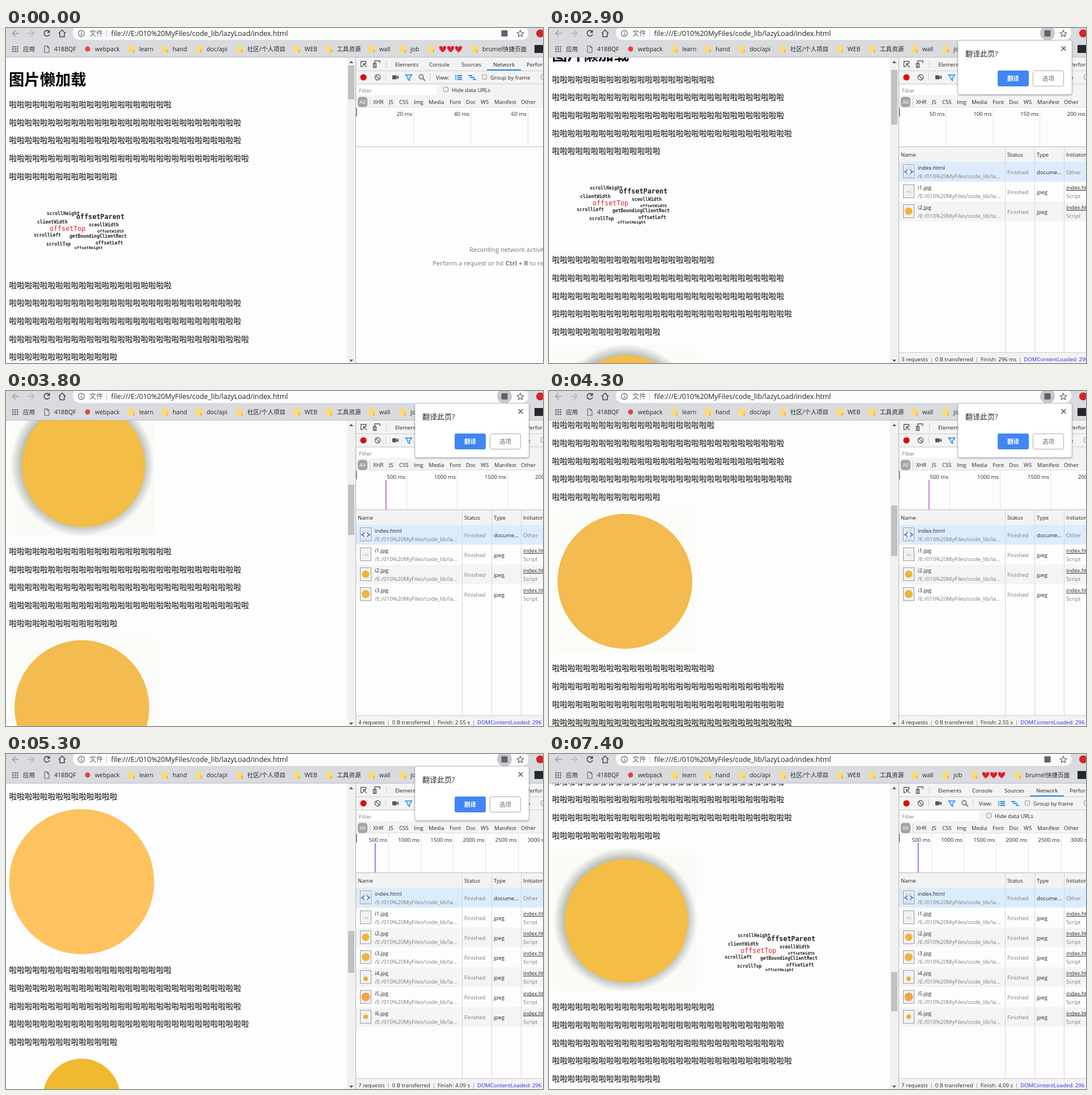
An HTML page that plays this animation: 948 px wide and 591 px high, repeating every 7.7 s.

```html
<!DOCTYPE html>
<html lang="zh-CN">
<head>
<meta charset="utf-8">
<title>图片懒加载</title>
<style>
  html, body { margin: 0; width: 100%; height: 100%; overflow: hidden; }
  svg { display: block; font: 9.6px "Open Sans", "Noto Sans CJK SC", "Noto Sans CJK", sans-serif; fill: #262626; }
  .page { font-size: 13.67px; fill: #000; }
  .mono { font-family: "DejaVu Sans Mono", monospace; font-weight: bold; }
  .bar { font-size: 10.6px; }
  .dim { fill: #7c7c7c; }
  .path { font-size: 9.8px; }
  .end { text-anchor: end; }
  .mid { text-anchor: middle; }
</style>
</head>
<body>
<svg id="stage" width="948" height="591" viewBox="0 0 948 591"></svg>
<script>
const LOOP = 7700, STEP = 100;
const GREY = '#5f6368', BLUE = '#1a8cf0', LINE = '#ccc', PANEL = '#f3f3f3', BAR = '#d9dbdf';

const text = (x, y, s, attrs = '') => `<text x="${x}" y="${y}" ${attrs}>${s}</text>`;
const rect = (x, y, w, h, fill, attrs = '') =>
  `<rect x="${x}" y="${y}" width="${w}" height="${h}" fill="${fill}" ${attrs}/>`;
const disc = (x, y, r, fill, attrs = '') => `<circle cx="${x}" cy="${y}" r="${r}" fill="${fill}" ${attrs}/>`;
const shape = (d, fill) => `<path d="${d}" fill="${fill}"/>`;
const stroke = (d, color = GREY, width = 1.3) =>
  `<path d="${d}" fill="none" stroke="${color}" stroke-width="${width}"/>`;
const each = (list, fn) => list.map(fn).join('');
const range = n => [...Array(n).keys()];

// ---- page content ----
const WORDS = [
  ['scrollHeight', 72, 330, 8], ['offsetParent', 124, 337, 11.8], ['clientWidth', 55, 345, 8.1],
  ['sceollWidth', 146, 350, 8], ['offsetTop', 77, 358, 11.7, '#e8202a'], ['offsetWidth', 161, 361, 7.1],
  ['scrollLeft', 49, 368, 8], ['getBoundingClientRect', 112, 370, 8], ['scrollTop', 71, 384, 8],
  ['offsetLeft', 158, 382, 8.1], ['offsetHeight', 121, 390, 6.9]
];
const cloud = (dx, dy) => `<g class="mono" transform="translate(${dx} ${dy - 262})">` +
  each(WORDS, ([s, x, y, size, color = '#222']) =>
    text(x, y, s, `font-size="${size}" fill="${color}"` + (s === 'offsetTop' ? ' font-weight="400"' : ''))) + '</g>';

const crown = y => `<g transform="translate(0 ${y})">` +
  shape('M89 135L77 87L97 107L105 79L119 105L133 76L148 105L162 79L171 107L191 87L177 135Z', '#c9a24b') +
  rect(88, 136, 90, 7, '#c9a24b', 'rx="3"') +
  each([[74, 79, 5], [104, 71, 6], [133, 66, 7], [163, 71, 6], [193, 79, 5]], ([x, cy, r]) =>
    shape(`M${x - r} ${cy}l${r} ${-r}l${r} ${r}l${-r} ${r}z`, '#c9a24b')) + '</g>';

const haloBall = y => rect(6, y + 24, 255, 250, '#fafbf7') +
  disc(135, y + 149, 127, 'url(#halo)') + disc(136.5, y + 150.5, 109, '#f4bd45');

// Each picture is drawn relative to the text line above it; gap is the distance to the next line.
const PICTURES = [
  { gap: 191.7, draw: y => cloud(0, y) },
  { gap: 302.5, draw: haloBall },
  { gap: 302.5, draw: y => rect(6, y + 24, 255, 250, '#fbfcf8') + disc(134, y + 148.8, 119, '#f3bb50') },
  { gap: 302.5, draw: y => crown(y) + disc(133.5, y + 196, 68, '#f2b53c') },
  { gap: 306, draw: y => disc(133.5, y + 150, 128, '#fec25f') },
  { gap: 205.5, draw: y => disc(133.5, y + 97.5, 68, '#f0b92f') },
  { gap: 302.5, draw: y => haloBall(y) + cloud(261, y + 111.5) }
];
const PITCH = 31.7;

function page(scroll, loaded) {
  let y = 135 - scroll;
  let out = rect(0, 52, 617, 539, '#fdfdfd') +
    text(5, 101 - scroll, '图片懒加载', 'font-size="27.34" font-weight="700"');
  for (const [k, picture] of [...PICTURES, null].entries()) {
    out += each([21, 30, 30, 31, 14], (n, i) => text(5.5, y + i * PITCH + 5, '啦'.repeat(n)));
    y += 4 * PITCH;
    if (!picture) break;
    if (k < loaded) out += picture.draw(y);
    y += picture.gap;
  }
  return `<g class="page">${out}</g>`;
}

function scrollbar(scroll, height) {
  const track = 514;
  return rect(602, 52, 15, 539, '#f1f1f1') + shape('M606 62l3.5-4l3.5 4z', '#555') +
    shape('M606 585l3.5 4l3.5-4z', '#555') +
    rect(604, 66 + scroll * track / height, 11, track * 539 / height, '#c1c1c1');
}

// ---- browser bars ----
const FOLDERS = [[216, 'learn'], [275, 'hand'], [335, 'doc/api'], [407, '社区/个人项目'], [508, 'WEB'],
  [565, '工具资源'], [640, 'wall'], [695, 'job'], [745, ''], [822, 'brumel快捷页面']];
const heart = x => shape(`M${x} 43C${x - 11} 35 ${x - 5} 28 ${x} 34C${x + 5} 28 ${x + 11} 35 ${x} 43Z`, '#e0202f');

const browserBars = (reloadLit, translateLit) => rect(0, 0, 948, 52, BAR) + rect(0, 51, 948, 1, '#b9bbbf') +
  rect(118, -4, 804, 25, '#fcfcfd', 'rx="12"') +
  (reloadLit ? disc(72, 9, 11.5, '#bfc1c6') : '') + (translateLit ? disc(880, 9, 13, '#c6c8cc') : '') +
  stroke('M23 9.5H12M17 4l-5.5 5.5l5.5 5.5', '#9b9ea3', 1.5) +
  stroke('M38 9.5H49M44 4l5.5 5.5l-5.5 5.5', '#b0b3b7', 1.5) +
  stroke('M76 6A5 5 0 1 0 77 11', '#45484c', 1.6) + shape('M77.5 3v5.5h-5.5z', '#45484c') +
  stroke('M93 9.5l6-6l6 6M95 8.5v7h8v-7', '#45484c', 1.5) +
  disc(133, 9.5, 5.3, 'none', `stroke="${GREY}" stroke-width="1.2"`) + stroke('M133 8.5v4M133 6v1.3') +
  text(147, 14, '文件', `font-size="12.2" fill="${GREY}"`) + rect(177, 3, 1, 13, '#c4c6ca') +
  text(185.5, 14, 'file:///E:/010%20MyFiles/code_lib/lazyLoad/index.html', 'font-size="12.46" fill="#222"') +
  rect(874.5, 4, 11, 11, GREY, 'rx="1"') +
  stroke('M908 4l1.7 3.8l4 .4l-3 2.8l.9 4l-3.6-2.1l-3.6 2.1l.9-4l-3-2.8l4-.4z', GREY, 1.2) +
  disc(943, 9.5, 7, '#d8232a') +
  `<g class="bar">` +
  each(range(9), i => rect(11 + i % 3 * 4, 32 + (i / 3 | 0) * 4, 2.4, 2.4, GREY)) + text(30, 41, '应用') +
  stroke('M68 31.5h5l3 3v8.5h-8zM73 31.5v3h3', GREY, 1.1) + text(85, 41, '418BQF') +
  disc(144, 37, 4.5, '#e8423c') + text(157, 41, 'webpack') +
  each(FOLDERS, ([x, name]) => rect(x, 31, 11, 12.5, '#fbdb78', 'rx="1"') +
    rect(x + 8, 38, 3, 5.5, '#efc04b') + text(x + 19, 41, name)) +
  each([771, 785, 799], heart) + rect(933, 30, 15, 14, '#24272b') + '</g>';

// ---- developer tools ----
const TABS = [[687, 'Elements'], [747, 'Console'], [804, 'Sources'], [860, 'Network'], [919, 'Performance']];
const TYPES = [[648, 'XHR'], [676, 'JS'], [694, 'CSS'], [720, 'Img'], [746, 'Media'], [783, 'Font'],
  [812, 'Doc'], [838, 'WS'], [862, 'Manifest'], [909, 'Other']];
const checkbox = (x, y) => rect(x + .5, y + .5, 8, 8, '#eee', 'rx="1.5" stroke="#9a9a9a"');

const TOOLS = rect(617, 52, 331, 539, '#fdfdfd') + rect(617, 52, 331, 88, PANEL) +
  rect(617, 75, 331, 1, LINE) + rect(617, 98, 331, 1, LINE) + rect(617, 139, 331, 1, '#ddd') +
  stroke('M630 68h-3.5v-9h9v3.5M631 63l6 6M631 67.5V63h4.5', '#555') +
  stroke('M651 69v-11h9v4M648.5 62.5h5v7h-5z', '#555') + rect(671, 57, 1, 13, LINE) +
  each(TABS, ([x, s]) => text(x, 67.5, s)) + rect(849, 73, 60, 2, BLUE) +
  disc(631, 87, 5.6, '#e00b0b') + disc(656, 87, 4.7, 'none', 'stroke="#555" stroke-width="1.4"') +
  stroke('M652.5 83.5l7 7', '#555') + rect(670, 80, 1, 13, LINE) +
  rect(682, 83.5, 7.5, 7, '#555') + shape('M689 87l4-3.5v7z', '#555') +
  stroke('M705.5 82.7h11l-4 5v5l-3-2v-3z', BLUE, 1.5) +
  disc(733, 86, 3.8, 'none', 'stroke="#555" stroke-width="1.3"') + stroke('M736 89l4 4', '#555', 1.6) +
  rect(748, 80, 1, 13, LINE) + text(759, 90.5, 'View:') +
  each([83, 86.3, 89.6], y => rect(793, y, 2, 2, BLUE) + rect(796.5, y, 8.5, 2, BLUE)) +
  rect(816, 83, 7, 2, BLUE) + rect(819, 86.3, 8, 2, BLUE) + rect(824, 89.6, 6, 2, BLUE) +
  checkbox(840, 82) + text(855, 90.5, 'Group by frame') + checkbox(944, 82) +
  rect(620, 101, 140, 17, '#fff') + text(623, 114, 'Filter', 'class="dim"') +
  checkbox(772, 104) + text(787, 112.5, 'Hide data URLs') +
  rect(621, 121.5, 17, 18, '#a3a3a3', 'rx="5"') + text(629.5, 134, 'All', 'class="mid" style="fill:#fff"') +
  rect(642, 123, 1, 14, LINE) + each(TYPES, ([x, s]) => text(x, 134, s));

// Scale of the overview, page height and finish time by number of listed requests.
const NETWORK = {
  0: { tick: 20, gap: 101, height: 4617 },
  1: { tick: 50, gap: 82.8, height: 2870, finish: '296 ms' },
  3: { tick: 50, gap: 82.8, height: 2870, finish: '296 ms' },
  4: { tick: 500, gap: 89, height: 3113, finish: '2.55 s', mark: '#a860b8' },
  5: { tick: 500, gap: 71.5, height: 3375, finish: '3.37 s', mark: '#f28080' },
  7: { tick: 500, gap: 57.1, height: 3744, finish: '4.09 s', mark: '#6a62ea' }
};

const overview = ({ tick, gap, mark }) => rect(618, 209, 330, 1, '#bbb') + rect(618, 141, 1.5, 15, '#777') +
  each(range(6), i => {
    const x = 618 + gap * (i + 1);
    return rect(Math.round(x), 140, 1, 69, '#e4e4e4') + text(x - 2, 154.5, tick * (i + 1) + ' ms', 'class="end"');
  }) + (mark ? rect(Math.round(618 + 296 * gap / tick) - 1, 157, 1.5, 52, mark) : '');

const BALLS = [, , '#eeb53a', '#eeb53a', '#e6b03c', '#f3a445', '#eab02e'];

function requestIcon(i, y, pending) {
  const box = rect(625.5, y + 5.5, 19, 23, i ? '#f1f1f1' : '#f3f5f8', 'stroke="#999"');
  if (!i) {
    return box + each([9, 12, 23, 26], d => rect(628, y + d, 14, 1, '#b4bcc6')) +
      stroke(`M633 ${y + 14}l-5 3.5l5 3.5M637 ${y + 14}l5 3.5l-5 3.5`, '#3f7fe0', 2);
  }
  if (pending) return box;
  return box + (i === 1 ? rect(631, y + 17, 8, 1, '#bbb') + rect(633, y + 19, 7, 1, '#ccc')
    : disc(635, y + (i === 4 ? 20 : 17), [, , 6.5, 7, 4, 7.5, 4][i], BALLS[i]));
}

function request(i, pending) {
  const y = 236 + 35.1 * i, wait = i && pending;
  return rect(618, y, 330, 35.1, i ? (i % 2 ? '#fdfdfd' : '#f4f4f4') : '#dcecfd') + requestIcon(i, y, wait) +
    text(651, y + 14, i ? `i${i}.jpg` : 'index.html') +
    text(651, y + 29, '/E:/010%20MyFiles/code_lib/la...', 'class="dim path"') +
    text(809, y + 21.5, wait ? '(pending)' : 'Finished', 'class="dim"') +
    text(861, y + 21.5, wait ? '' : i ? 'jpeg' : 'docume...') +
    (i ? text(913, y + 14, 'index.html', 'text-decoration="underline"') + text(913, y + 29, 'Script', 'class="dim"')
       : text(913, y + 21.5, 'Other', 'class="dim"'));
}

const EMPTY = '<g font-size="11.2" style="fill:#777">' + text(818, 395, 'Recording network activity...') +
  text(753, 419, 'Perform a request or hit <tspan font-weight="700">Ctrl + R</tspan> to record the reload.') + '</g>';

const bar = (before, after) => `<tspan dx="${before}" class="dim">|</tspan><tspan dx="3.8" ${after}</tspan>`;

const table = (rows, finish, pending) => rect(618, 210, 330, 26, PANEL) +
  each([[621, 'Name'], [809, 'Status'], [861, 'Type'], [913, 'Initiator']], ([x, s]) => text(x, 227, s)) +
  rect(618, 236, 330, 1, LINE) + each(range(rows), i => request(i, pending)) +
  each([805, 857, 909], x => rect(x, 210, 1, 362, '#d4d4d4')) +
  rect(618, 572, 330, 19, PANEL) + rect(618, 572, 330, 1, LINE) +
  text(622, 588, `${rows} requests` + bar(3.8, '>0 B transferred') +
    bar(3.8, `>Finish: ${pending ? '4 ms' : finish}`) + bar(3.8, 'fill="#2a2af0">DOMContentLoaded: 296 ms'));

const POPUP = rect(722, 22, 201, 95, '#fff', 'rx="3" stroke="#bbb" stroke-width=".6" filter="url(#shadow)"') +
  text(735, 50, '翻译此页?', 'font-size="13"') + stroke('M904.5 32l8 8M912.5 32l-8 8', '#555', 1.5) +
  rect(792, 75, 55, 28, '#4285f4', 'rx="3"') +
  text(819.5, 93, '翻译', 'class="mid" font-size="10.5" font-weight="700" style="fill:#fff"') +
  rect(854.5, 75.5, 54, 27, '#fff', 'rx="3" stroke="#aaa"') +
  text(881.5, 93, '选项', 'class="mid" font-size="10.5" style="fill:#666"');

const DEFS = `<defs>
  <radialGradient id="halo"><stop offset=".84" stop-color="#b6bbb4"/><stop offset="1" stop-color="#fafbf7"/></radialGradient>
  <filter id="shadow"><feDropShadow dx="0" dy="1" stdDeviation="1.5" flood-opacity=".45"/></filter></defs>`;

// ---- timeline ----
const SCROLLS = [[2800, 3100, 171], [3300, 3800, 599.8], [4100, 4500, 1045.5], [4700, 5100, 1664], [5200, 5600, 2489.6]];

function scrollAt(t) {
  let y = 0;
  for (const [start, end, to] of SCROLLS) {
    const u = Math.min(1, Math.max(0, (t - start) / (end - start)));
    y += (to - y) * u * u * (3 - 2 * u);
  }
  return y;
}

const rowsAt = t => t < 1300 ? 0 : t < 1400 ? 1 : t < 3700 ? 3 : t < 4400 ? 4 : t < 5000 ? 5 : 7;

function scene(t) {
  const rows = rowsAt(t), net = NETWORK[rows], scroll = scrollAt(t), pending = t < 1700;
  const popup = t >= 1800 && t < 7400, allLoaded = t >= 5400;
  return DEFS + page(scroll, allLoaded ? 7 : Math.max(1, rows - 1)) +
    scrollbar(scroll, allLoaded ? 4015 : net.height) +
    TOOLS + overview(net) + (rows ? table(rows, net.finish, pending) : EMPTY) + rect(617, 52, 1, 539, '#b5b5b5') +
    browserBars(t >= 1000 && t < 1700, popup) + (popup ? POPUP : '');
}

const stage = document.getElementById('stage');
let shown = -1;
function tick(now) {
  const t = Math.floor(now % LOOP / STEP) * STEP;
  if (t !== shown) stage.innerHTML = scene(shown = t);
  requestAnimationFrame(tick);
}
tick(performance.now());
</script>
</body>
</html>
```
